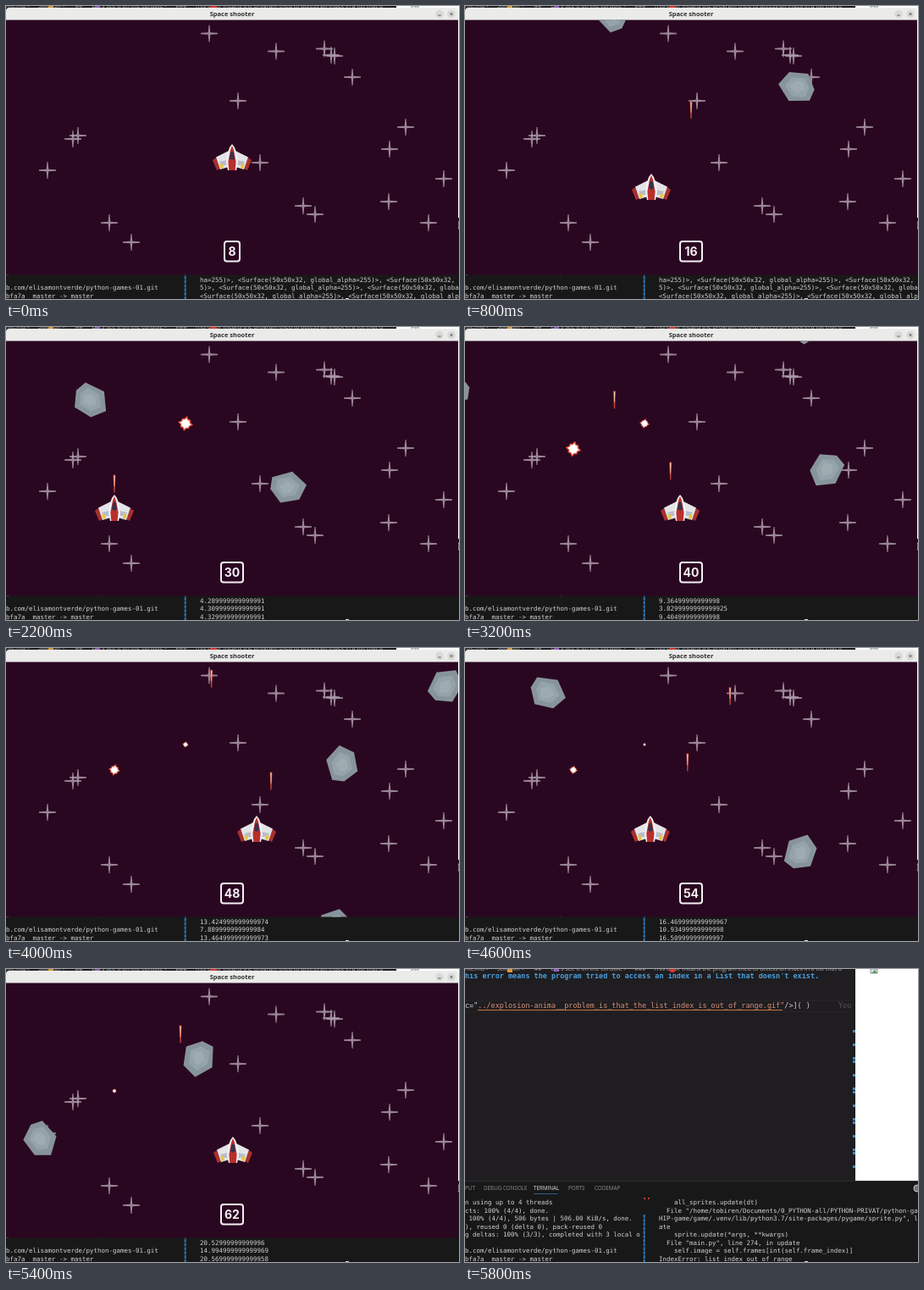
Animation, 535 px wide and 346 px high, one loop 6 s. Source, as an HTML page:

```html
<!DOCTYPE html>
<html lang="en">
<head>
<meta charset="utf-8">
<title>Space shooter</title>
<style>
  html, body { margin: 0; width: 535px; height: 346px; overflow: hidden; background: #181818; }
  svg { display: block; }
  text { white-space: pre; }
  .code { font: 8.48px "DejaVu Sans Mono", monospace; }
  .bold { font-weight: bold; }
  .term { font: 7.48px "DejaVu Sans Mono", monospace; fill: #d2d2d2; }
  .tab { font: 6.3px "Open Sans", "Noto Sans", sans-serif; fill: #8f8f8f; }
  .crumb { font: 7px "Open Sans", "Noto Sans", sans-serif; fill: #a8a8a8; }
  .title { font: bold 7.5px "Open Sans", "Noto Sans", sans-serif; fill: #2e2e2e; text-anchor: middle; }
  .score { font: 700 14px Inter, "Open Sans", sans-serif; fill: #f4f0f3; text-anchor: middle; }
</style>
</head>
<body>
<svg width="535" height="346" viewBox="0 0 535 346">
  <defs>
    <clipPath id="sky"><rect y="16.5" width="534" height="301"/></clipPath>
    <clipPath id="leftPane"><rect y="266" width="208" height="80"/></clipPath>
    <path id="star" fill="#ad9daa" fill-opacity=".85"
      d="M-.5-10H.5L1.3-1.3 10-.7V.7L1.3 1.3 .5 10H-.5L-1.3 1.3-10 .7V-.7L-1.3-1.3Z"/>
    <g id="meteor">
      <path fill="#87949a" d="M-9-18 11-16 20-5 9 17-14 19-21 1Z"/>
      <path fill="#94a3a9" d="M-6-12 7-11 14-2 6 11-9 13-14 1Z"/>
      <path fill="#9eacb1" d="M-4-8 6-6 5 5-6 8-8 0Z"/>
    </g>
    <g id="laser">
      <path fill="#c4453a" d="M-1.4-10.5H1.4L.6 10.5H-.6Z"/>
      <path fill="#f4d0ac" d="M-.7-9.5H.7L.3 3H-.3Z"/>
    </g>
    <path id="blast" fill="#fff" stroke="#d8452f" stroke-width="1.7" stroke-linejoin="round"/>
    <g id="wing">
      <path fill="#a8302c" d="M-19 16-23 19-18 31-14 29Z"/>
      <path fill="#e4e4e8" d="M-4 8-19 15.5-14 30-4 27Z"/>
      <path fill="#b9bdc8" d="M-6 19-15 21-12 25-6 25Z"/>
      <path fill="#e6c637" d="M-15 23-11 24-10 28-13 29Z"/>
    </g>
  </defs>

  <!-- editor -->
  <rect width="461" height="250" fill="#1f1d20"/>
  <path d="M0 37.5H455M0 50.5H455" stroke="#262427"/>
  <text class="code bold" y="11" fill="#4a9fdc">his error means the program tried to access an index in a List that doesn't exist.</text>
  <rect width="461" height="5" fill="#1f1d20"/>
  <text class="crumb" y="2">me.md &gt;     Solution &gt;      ##      Let's see it on the console &gt;     ###     This error means the program tried to access an index in a list that d</text>
  <path fill="#8b62b5" d="M105 0h6v3h-6z"/>
  <path fill="#d99a3c" d="M50 0h6v4h-6z"/>
  <circle cx="245" cy="0" r="4" fill="#d6382f"/>
  <text class="code" y="46" fill="#d0d0d0">c="<tspan fill="#d0917a">../explosion-anima__problem_is_that_the_list_index_is_out_of_range.gif"</tspan>/&gt;]( )</text>
  <path d="M15 48.5H375" stroke="#c9743f"/>
  <text class="code" x="441" y="46" fill="#555358">You</text>
  <g id="ruler" fill="#3d86bf"></g>
  <rect x="461" width="74" height="250" fill="#fff"/>
  <path d="M479 0h8v5h-8z" fill="#dce6ee" stroke="#8c9499"/>
  <path d="M480 5 484 1 487 5Z" fill="#58a05a"/>

  <!-- panel -->
  <rect y="250" width="535" height="96" fill="#181818"/>
  <path d="M0 250.5H535" stroke="#2c2c2c"/>
  <g class="tab">
    <text y="261">PUT</text>
    <text x="22" y="261">DEBUG CONSOLE</text>
    <text x="81" y="261" fill="#e2e2e2">TERMINAL</text>
    <text x="122" y="261">PORTS</text>
    <text x="153" y="261">CODEMAP</text>
  </g>
  <path d="M81 265.5H109" stroke="#2d5f86"/>
  <circle cx="534" cy="259" r="4" fill="#777" stroke="#c8c8c8"/>
  <g id="left" class="term" clip-path="url(#leftPane)"></g>
  <path d="M211.7 290V346" stroke="#2f78b4" stroke-width="2" stroke-dasharray="4 .8"/>
  <path d="M211 270h2v2h-2zM216 270h2v2h-2z" fill="#c23b3b"/>
  <g id="right" class="term"></g>
  <path d="M401 345.5h4" stroke="#ddd"/>

  <!-- game window -->
  <g id="game">
    <path d="M0 17V6Q0 2 4 2H530Q534 2 534 6V17Z" fill="#ebebea"/>
    <text class="title" x="267" y="12">Space shooter</text>
    <g fill="#d9d9d8"><circle cx="512" cy="9.5" r="4.8"/><circle cx="526" cy="9.5" r="4.8"/></g>
    <path d="M510.3 11h3.4M524.5 8l3 3m0-3l-3 3" stroke="#3a3a3a" stroke-width=".8"/>
    <rect y="16.5" width="534" height="301" fill="#2a0721"/>
    <g clip-path="url(#sky)">
      <g id="stars"></g>
      <g id="ship">
        <use href="#wing"/>
        <use href="#wing" transform="scale(-1 1)"/>
        <path fill="#f1f1f3" d="M0 0 3 4 6 13 7 22 5 31H-5L-7 22-6 13-3 4Z"/>
        <path fill="#b92f2b" d="M0 2 2 7 4.6 21 3.7 31H-3.7L-4.6 21-2 7Z"/>
        <path fill="#35324f" d="M-1.5 9H1.5L3 17 0 19-3 17Z"/>
      </g>
      <g id="actors"></g>
      <rect id="frame" y="278" height="23.5" rx="3" fill="none" stroke="#f4f0f3" stroke-width="2"/>
      <text id="score" class="score" x="267" y="295"></text>
    </g>
  </g>
</svg>
<script>
const STEP = 200, STEPS = 30, CRASH = 28;
const LASER_SPEED = 33.4, MUZZLE = 192, SPIN = 10, HIT_RANGE = 30;
const $ = id => document.getElementById(id);

function add(parent, tag, attrs) {
  const el = document.createElementNS("http://www.w3.org/2000/svg", tag);
  for (const k in attrs) el.setAttribute(k, attrs[k]);
  return $(parent).appendChild(el);
}
const use = id => add("actors", "use", { href: "#" + id });
const show = (el, on) => el.setAttribute("visibility", on ? "inherit" : "hidden");
const move = (el, x, y, rest = "") => el.setAttribute("transform", `translate(${x} ${y}) ${rest}`);

// linear interpolation through [time, value] points
function track(points, t) {
  let i = 1;
  while (i < points.length - 1 && t > points[i][0]) i++;
  const [t0, a] = points[i - 1], [t1, b] = points[i];
  return a + (b - a) * Math.max(0, Math.min(1, (t - t0) / (t1 - t0)));
}

const stars = "240,32.5 319,53.5 376,50.5 384,58 388,59 409,84 274,112 85,153 79,157 49,194 " +
  "300,185 472,143 453,169 517,204 452,231 499,256 351,236 365,246 122,256 148,279";
for (const p of stars.split(" "))
  add("stars", "use", { href: "#star", transform: `translate(${p})` });

for (let i = 0; i < 14; i++)
  add("ruler", "rect", { x: 458, y: 72 + i * 12 + 4 * (i % 3), width: 3, height: 3 });

$("blast").setAttribute("d", "M" + Array.from({ length: 16 }, (_, i) => {
  const a = i * Math.PI / 8 + .2, r = i % 2 ? 6.6 : i % 4 ? 8.2 : 10;
  return (r * Math.cos(a)).toFixed(1) + " " + (r * Math.sin(a)).toFixed(1);
}).join("L") + "Z");

const shipX = [[2.1, 267], [4, 220], [4.4, 212], [8, 128], [11, 128], [15.3, 242], [16, 254],
  [18.4, 313], [19.3, 313], [20, 296], [23.5, 206], [24.5, 206], [27, 268]];
const shipTop = [[.3, 163], [1.7, 198]];

// every shot leaves from the ship; a hit names the height where it bursts
const shots = [{ at: 1.93 }, { at: 4.4, hit: 114 }, { at: 10.79, hit: 144 }, { at: 12.83 },
  { at: 15.34 }, { at: 18.95 }, { at: 21.29 }, { at: 23.56 }];
for (const s of shots) {
  s.x = track(shipX, s.at);
  s.end = s.at + (MUZZLE - (s.hit || 0)) / LASER_SPEED;
  s.el = use("laser");
}
const blasts = shots.filter(s => s.hit);
for (const b of blasts) b.burst = use("blast");
const blastIndex = (b, n) => 1.015 * (n - b.end);

// x and time at the top edge, then speed across and down
const meteors = [
  [409, 1.4, -6, 37], [170, 3.7, 13, 36], [306, 5.9, 5, 37], [90, 8.75, 4, 38], [469, 11.8, -9.7, 40],
  [16, 14, -15, 37], [398, 16, -.4, 34.6], [501, 18.8, 14, 38], [116, 21.6, -14, 37], [211, 24.1, 6, 36]
].map(([x0, enter, vx, vy], i) => {
  const x = n => x0 + vx * (n - enter), y = n => vy * (n - enter);
  const hit = blasts.find(b => Math.hypot(x(b.end) - b.x, y(b.end) - b.hit) < HIT_RANGE);
  return { x, y, end: hit ? hit.end : STEPS, angle: n => 37 + 70 * i + SPIN * (n - enter), el: use("meteor") };
});

const lineY = i => 278 + i * 9.55;
const leftText = ["n using up to 4 threads", "cts: 100% (4/4), done.",
  " 100% (4/4), 506 bytes | 506.00 KiB/s, done.", "), reused 0 (delta 0), pack-reused 0",
  "g deltas: 100% (3/3), completed with 3 local o", "",
  "b.com/elisamontverde/python-games-01.git", "bfa7a  master -> master"];
leftText.forEach((s, i) => add("left", "text", { y: lineY(i) }).textContent = s);

const rightLines = leftText.map((_, i) => add("right", "text", { x: 229, y: lineY(i) }));
const traceback = ["    all_sprites.update(dt)",
  '  File "/home/tobiren/Documents/0_PYTHON-all/PYTHON-PRIVAT/python-ga',
  'HIP-game/game/.venv/lib/python3.7/site-packages/pygame/sprite.py", l', "ate",
  "    sprite.update(*args, **kwargs)", '  File "main.py", line 274, in update',
  "    self.image = self.frames[int(self.frame_index)]", "IndexError: list index out of range"];
const surface = "<Surface(50x50x32, global_alpha=255)>, ".repeat(3);
const surfaces = ["ha=255)>, " + surface, "5)>, " + surface, surface];

// rounded to the game's tick, with accumulated float error
const printed = index => String(Math.round(index * 200) / 200 - index * 2e-15);

function output(n) {
  if (n >= CRASH) return traceback;
  const pad = Array(5).fill(""), [first, second] = blasts;
  if (n < first.end) return pad.concat(surfaces);
  const i = blastIndex(first, n);
  const middle = n < second.end ? i - .02 : blastIndex(second, n);
  return pad.concat([i - .04, middle, i].map(printed));
}

function draw(n) {
  output(n).forEach((s, i) => rightLines[i].textContent = s);
  show($("game"), n < CRASH);
  if (n >= CRASH) return;

  move($("ship"), track(shipX, n), track(shipTop, n));
  for (const m of meteors) {
    show(m.el, n < m.end);
    move(m.el, m.x(n), m.y(n), `rotate(${m.angle(n)})`);
  }
  for (const s of shots) {
    show(s.el, n >= s.at && n < s.end);
    move(s.el, s.x, MUZZLE - LASER_SPEED * (n - s.at));
  }
  for (const b of blasts) {
    show(b.burst, n >= b.end);
    move(b.burst, b.x, b.hit, `scale(${Math.max(.07, 1.05 - .053 * blastIndex(b, n))})`);
  }

  const points = 8 + 2 * n, width = points < 10 ? 18 : 26;
  $("score").textContent = points;
  $("frame").setAttribute("x", 267 - width / 2);
  $("frame").setAttribute("width", width);
}

const start = performance.now();
let shown = -1;
function tick() {
  const n = Math.floor((performance.now() - start) / STEP) % STEPS;
  if (n !== shown) draw(shown = n);
  requestAnimationFrame(tick);
}
tick();
</script>
</body>
</html>
```
